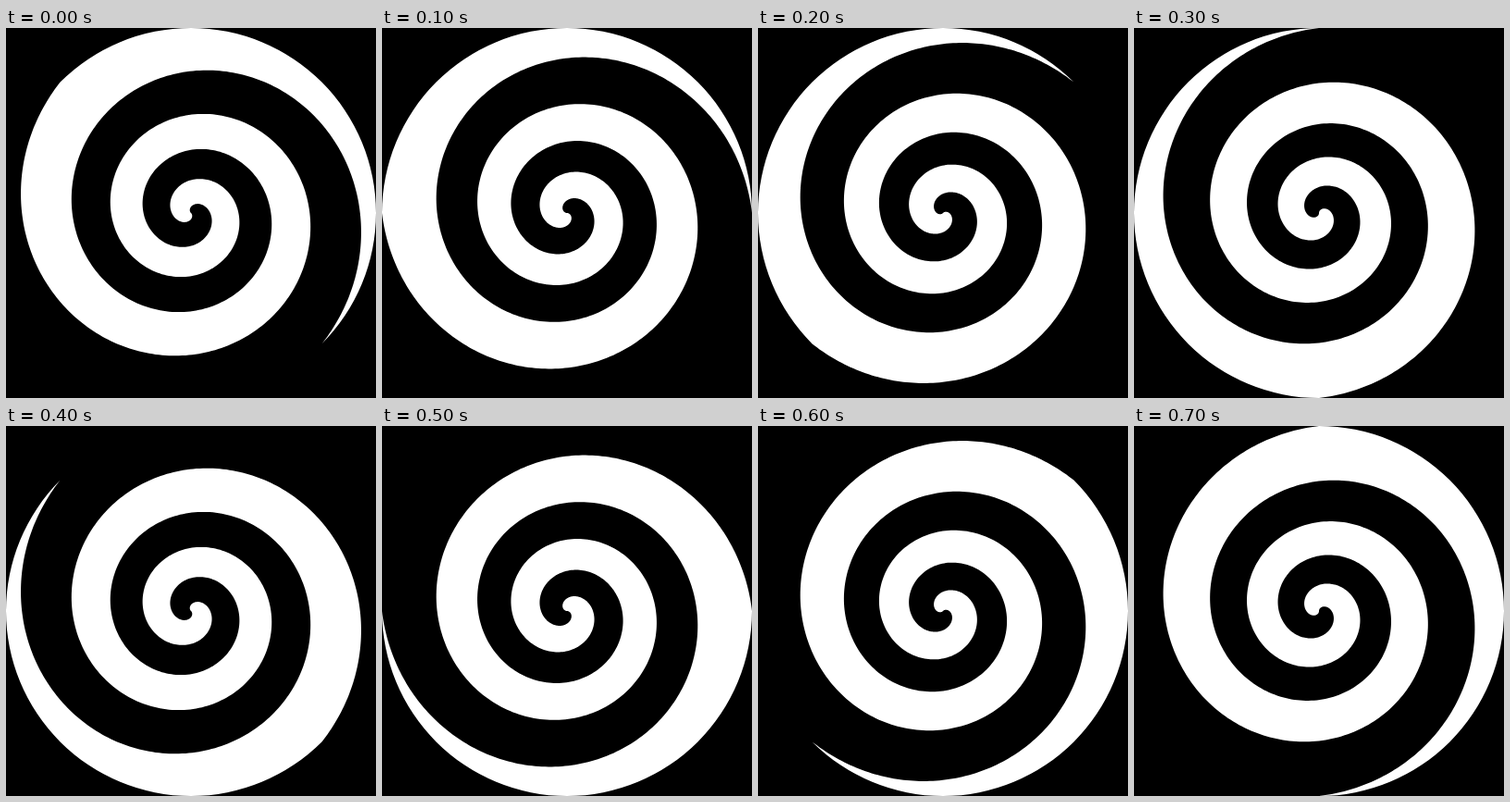
An HTML page with a canvas that plays this animation: 400 px wide and 400 px high, repeating every 0.8 s.

```html
<!DOCTYPE html>
<html lang="en">
<head>
<meta charset="utf-8">
<title>Spiral</title>
<style>
  html, body { margin: 0; width: 100%; height: 100%; overflow: hidden; background: #000; }
  canvas { display: block; width: 400px; height: 400px; }
</style>
</head>
<body>
<canvas id="stage" width="400" height="400"></canvas>
<script>
const ctx = document.getElementById('stage').getContext('2d');
const SIZE = 400;
const R = SIZE / 2;
const TWIST = 5 * Math.PI;
const STEPS = 8;
const STEP_MS = 100;
const SAMPLES = 500;

// Share of the full twist reached at relative radius p (0 centre, 1 rim).
const twist = p => p * (1.5 - 0.545 * p + 0.045 * p * p);

function addArm(start, from, to) {
  for (let i = 0; i <= SAMPLES; i++) {
    const p = from + (to - from) * i / SAMPLES;
    const a = start - TWIST * (1 - twist(p));
    ctx.lineTo(R + R * p * Math.cos(a), R + R * p * Math.sin(a));
  }
}

function draw(tip) {
  ctx.fillStyle = '#000';
  ctx.fillRect(0, 0, SIZE, SIZE);
  ctx.beginPath();
  addArm(tip, 1, 0);
  addArm(tip - Math.PI, 0, 1);
  ctx.arc(R, R, R, tip - Math.PI, tip);
  ctx.closePath();
  ctx.fillStyle = '#fff';
  ctx.fill();
}

let t0 = null;
function frame(now) {
  if (t0 === null) t0 = now;
  const step = Math.floor((now - t0) / STEP_MS) % STEPS;
  draw(Math.PI / 4 - step * 2 * Math.PI / STEPS);
  requestAnimationFrame(frame);
}
requestAnimationFrame(frame);
</script>
</body>
</html>
```
